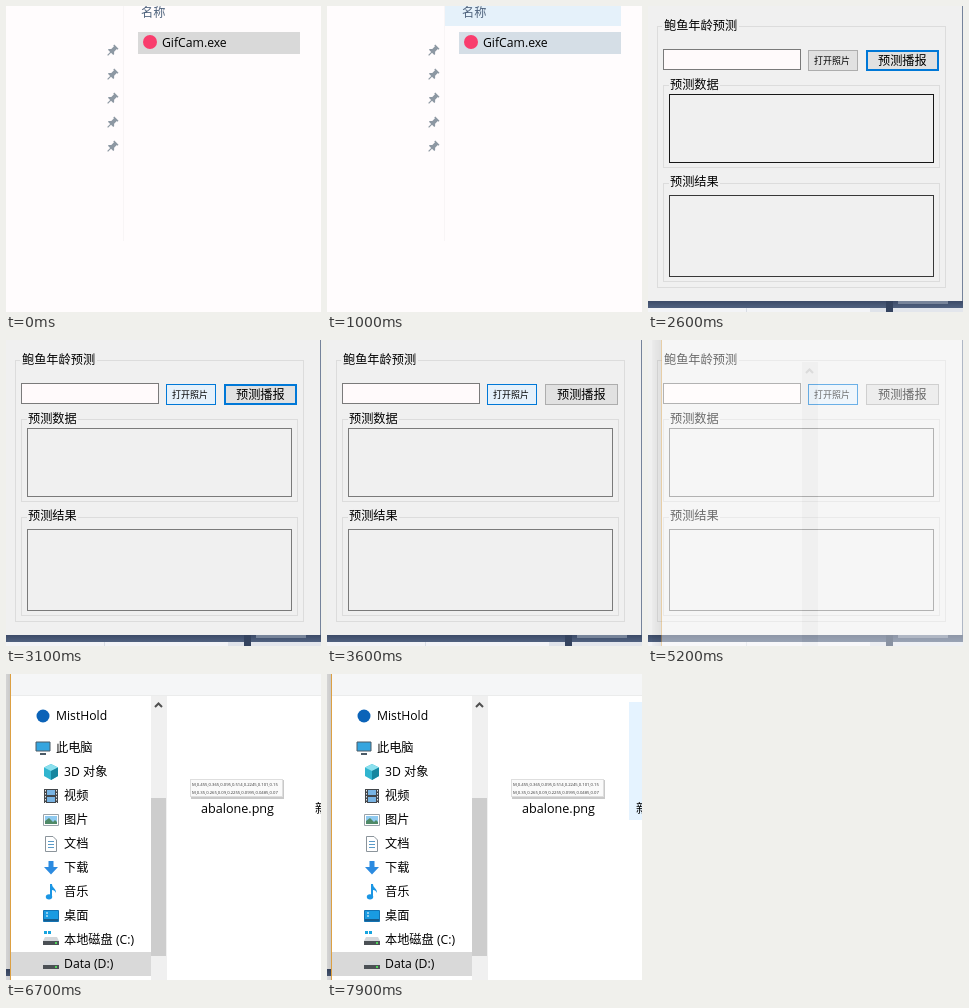
Animation of 315 by 306 pixels, one loop 8000 ms. Source, as an HTML page:

```html
<!DOCTYPE html>
<html lang="zh-CN">
<head>
<meta charset="utf-8">
<title>Open a picture</title>
<style>
html, body { margin: 0; width: 100%; height: 100%; overflow: hidden; background: #fff; }
svg { display: block; width: 315px; height: 306px; }
text { font: 12.2px "Open Sans", "Noto Sans CJK SC", "Noto Sans CJK JP", sans-serif; fill: #000; }
rect, .line { shape-rendering: crispEdges; }
.box { fill: none; stroke: #7a7a7a; }
.group { fill: none; stroke: #dcdcdc; }
.tiny { font-size: 4.2px; fill: #333; }
.small { font-size: 9px; }

/* One loop is 8 s, so 1.25% is 100 ms. */
.anim { animation: 8s step-end infinite; }
#files { animation-name: files; }
#head { animation-name: head; }
#row { animation-name: row; }
#data { animation-name: data; }
#result { animation-name: result; }
#open { animation-name: open; }
#ring { animation-name: ring; }
#dialog { animation-name: dialog; }
#thumb { animation-name: thumb; }
#arrow { animation-name: arrow; }
#ghost { animation-name: ghost; }
#tree { animation-name: tree; }
#items { animation-name: items; }
#hover { animation-name: hover; }

@keyframes files { 0% { visibility: visible } 26.25%, 100% { visibility: hidden } }
@keyframes head {
  0% { fill: #fffcfd } 11.25% { fill: #f3f7fb } 12.5% { fill: #e5f1fa }
  13.75% { fill: #d9ebf9 } 18.75% { fill: #ecf5fc } 20%, 100% { fill: #fff }
}
@keyframes row {
  0% { fill: #d9d9d9 } 11.25% { fill: #d0e3f2 } 12.5% { fill: #d5deE6 }
  13.75%, 100% { fill: #d9d9d9 }
}
@keyframes result {
  0% { stroke: #7a7a7a } 28.75% { stroke: #4a4a4a } 30% { stroke: #171717 }
  32.5% { stroke: #383838 } 33.75% { stroke: #5a5a5a } 35%, 100% { stroke: #7a7a7a }
}
@keyframes data {
  0% { stroke: #7a7a7a } 32.5% { stroke: #171717 } 35% { stroke: #4a4a4a }
  36.25%, 100% { stroke: #7a7a7a }
}
@keyframes open {
  0% { fill: #e1e1e1; stroke: #adadad } 36.25% { fill: #e3e9ee; stroke: #5793c2 }
  37.5% { fill: #e5f1fb; stroke: #0078d7 } 42.5% { fill: #cce4f7; stroke: #005499 }
  43.75%, 100% { fill: #e5f1fb; stroke: #0078d7 }
}
@keyframes ring { 0% { visibility: visible } 42.5%, 100% { visibility: hidden } }
@keyframes dialog {
  0% { opacity: 0; transform: translateX(9px) } 65% { opacity: .42; transform: translateX(9px) }
  66.25% { opacity: .85; transform: translateX(3px) } 67.5%, 100% { opacity: 1; transform: none }
}
@keyframes thumb { 0% { visibility: hidden } 76.25%, 100% { visibility: visible } }
@keyframes arrow { 0% { stroke: #bfbfbf } 76.25%, 100% { stroke: #505050 } }
@keyframes ghost { 0% { visibility: hidden } 67.5% { visibility: visible } 82.5%, 100% { visibility: hidden } }
@keyframes tree { 0% { visibility: hidden } 82.5%, 100% { visibility: visible } }
@keyframes items { 0% { visibility: hidden } 83.75%, 100% { visibility: visible } }
@keyframes hover { 0% { visibility: hidden } 98.75%, 100% { visibility: visible } }
</style>
</head>
<body>
<svg viewBox="0 0 315 306">
  <defs>
    <linearGradient id="shade">
      <stop offset="0" stop-color="#000" stop-opacity=".05"/>
      <stop offset="1" stop-color="#000" stop-opacity=".16"/>
    </linearGradient>
    <linearGradient id="navy" x2="0" y2="1">
      <stop offset="0" stop-color="#3c4b68"/>
      <stop offset="1" stop-color="#50617f"/>
    </linearGradient>
    <g id="pin" fill="#8d98a3">
      <path transform="rotate(45)" d="M-3-6.2H3V-4.8H2V-1L3.8.8V2H.6V6.2H-.6V2H-3.8V.8L-2-1V-4.8H-3Z"/>
    </g>
    <g id="disk">
      <path d="M2 6H14L16 10H0Z" fill="#d4d7da"/>
      <rect y="10" width="16" height="4" fill="#4b5055"/>
      <rect x="12" y="11" width="2" height="2" fill="#4fd35a"/>
    </g>
  </defs>

  <!-- Form window -->
  <g id="form">
    <rect width="315" height="306" fill="#f0f0f0"/>
    <rect x="314" width="1" height="296" fill="#75839b"/>
    <rect y="295" width="315" height="7" fill="url(#navy)"/>
    <rect y="302" width="222" height="4" fill="#f3f4f7"/>
    <rect x="98" y="302" width="1" height="4" fill="#d9dde4"/>
    <rect x="222" y="302" width="16" height="4" fill="#dfe3ea"/>
    <rect x="238" y="295" width="7" height="11" fill="#34435f"/>
    <rect x="245" y="302" width="70" height="4" fill="#e3e6ec"/>
    <rect x="250" y="295" width="50" height="3" fill="#77849a"/>

    <rect class="group" x="9.500" y="20.500" width="288" height="261"/>
    <rect class="group" x="15.500" y="79.500" width="276" height="82"/>
    <rect class="group" x="15.500" y="177.500" width="276" height="98"/>
    <g fill="#f0f0f0">
      <rect x="14" y="12" width="77" height="15"/>
      <rect x="21" y="71" width="51" height="14"/>
      <rect x="21" y="168" width="51" height="15"/>
    </g>
    <text x="16" y="24">鲍鱼年龄预测</text>
    <text x="22" y="83">预测数据</text>
    <text x="22" y="180">预测结果</text>

    <rect x="15.500" y="43.500" width="137" height="20" fill="#fffafb" stroke="#7a7a7a"/>
    <rect id="open" class="anim" x="160.500" y="44.500" width="49" height="20"/>
    <text class="small" x="166" y="58">打开照片</text>
    <rect x="218.500" y="44.500" width="72" height="20" fill="#e1e1e1" stroke="#adadad"/>
    <rect id="ring" class="anim" x="219" y="45" width="71" height="19" fill="none" stroke="#0078d7" stroke-width="2"/>
    <text x="230" y="59">预测播报</text>
    <rect id="data" class="box anim" x="21.500" y="88.500" width="264" height="68"/>
    <rect id="result" class="box anim" x="21.500" y="189.500" width="264" height="81"/>
  </g>

  <!-- Open dialog -->
  <g id="dialog" class="anim">
    <rect x="-5" width="9" height="306" fill="url(#shade)"/>
    <rect x="4" width="320" height="306" fill="#fff"/>
    <rect x="4" width="1" height="306" fill="#dca043"/>
    <g id="ghost" class="anim">
      <rect x="16" y="44" width="129" height="18" fill="#fff8f9"/>
      <g fill="none" stroke="#fcfcfc">
        <rect x="22.500" y="89.500" width="262" height="66"/>
        <rect x="22.500" y="190.500" width="262" height="79"/>
      </g>
    </g>
    <g id="tree" class="anim">
      <rect x="5" width="310" height="21" fill="#f5f6f7"/>
      <rect x="5" y="21" width="310" height="1" fill="#ebecec"/>
      <rect x="5" y="278" width="140" height="24" fill="#d9d9d9"/>

      <circle cx="37" cy="42" r="6.500" fill="#0b63b8"/>
      <g transform="translate(29 66)">
        <path d="M1 2H15V11H1Z" fill="#35a5df" stroke="#4b5a66"/>
        <path d="M5 14H11" stroke="#4b5a66" stroke-width="2"/>
      </g>
      <g transform="translate(37 90)">
        <path d="M8 0L15 3.500V12L8 16L1 12V3.500Z" fill="#31b5cf"/>
        <path d="M8 0L15 3.500L8 7L1 3.500Z" fill="#8be0ee"/>
        <path d="M8 7L15 3.500V12L8 16Z" fill="#15869f"/>
      </g>
      <g transform="translate(37 114)">
        <path d="M1 1H15V15H1Z" fill="#42464a"/>
        <path d="M4 2H12V7H4ZM4 9H12V14H4Z" fill="#78b4e4"/>
        <path d="M2.500 2V15M13.500 2V15" stroke="#e7e7e7" stroke-dasharray="1.500 1.500"/>
      </g>
      <g transform="translate(37 138)">
        <path d="M.5 2.500H15.500V13.500H.5Z" fill="#fff" stroke="#9aa3aa"/>
        <path d="M2 4H14V12H2Z" fill="#8fcaf0"/>
        <path d="M2 12V9L6 6L10 10L12 8L14 10V12Z" fill="#4f8a68"/>
      </g>
      <g transform="translate(37 162)">
        <path d="M2.500.5H10L13.500 4V15.500H2.500Z" fill="#fff" stroke="#8b949b"/>
        <path d="M5 5.500H11M5 8.500H11M5 11.500H11" stroke="#5b9bc8"/>
      </g>
      <path transform="translate(37 186)" d="M5.500 1H10.500V7H15L8 14.500L1 7H5.500Z" fill="#2c8be0"/>
      <g transform="translate(37 210)" fill="#1b96e4">
        <path d="M7 0H9C9 4 13 4 13 9C12 7 11 6 9 6V13H7Z"/>
        <ellipse cx="6" cy="12.800" rx="3.200" ry="2.600"/>
      </g>
      <g transform="translate(37 234)">
        <path d="M.5 2.500H15.500V13.500H.5Z" fill="#199be2" stroke="#1373b3"/>
        <path d="M1 12H15" stroke="#175d8e" stroke-width="2"/>
        <path d="M3 5H5M3 8H5" stroke="#fff"/>
      </g>
      <use href="#disk" x="37" y="257"/>
      <path d="M38 257H41V260H38ZM42 257H45V260H42Z" fill="#16a4df"/>
      <use href="#disk" x="37" y="281"/>

      <text x="50" y="46">MistHold</text>
      <text x="50" y="78">此电脑</text>
      <text x="58" y="102">3D 对象</text>
      <text x="58" y="126">视频</text>
      <text x="58" y="150">图片</text>
      <text x="58" y="174">文档</text>
      <text x="58" y="198">下载</text>
      <text x="58" y="222">音乐</text>
      <text x="58" y="246">桌面</text>
      <text x="58" y="270">本地磁盘 (C:)</text>
      <text x="58" y="294">Data (D:)</text>
    </g>
    <rect x="145" y="22" width="16" height="284" fill="#f0f0f0"/>
    <path id="arrow" class="anim" d="M149 33L152.500 29.500L156 33" fill="none" stroke-width="2"/>
    <rect id="thumb" class="anim" x="145" y="124" width="15" height="158" fill="#cdcdcd"/>
    <g id="items" class="anim">
      <rect id="hover" class="anim" x="302" y="28" width="13" height="118" fill="#e5f3ff"/>
      <rect x="185" y="106" width="93" height="19" fill="#c9c9c9"/>
      <rect x="184.500" y="105.500" width="92" height="17" fill="#fafafa" stroke="#dedede"/>
      <text class="tiny" x="186" y="112">M,0.455,0.365,0.095,0.514,0.2245,0.101,0.15</text>
      <text class="tiny" x="186" y="120">M,0.35,0.265,0.09,0.2255,0.0995,0.0485,0.07</text>
      <text x="231.500" y="139" text-anchor="middle" style="font-size:12.600px">abalone.png</text>
      <text x="309" y="139">新</text>
    </g>
  </g>

  <!-- File list -->
  <g id="files" class="anim">
    <rect width="315" height="306" fill="#fffcfd"/>
    <rect x="117" width="1" height="235" fill="#f8f5f6"/>
    <rect id="head" class="anim" x="118" width="176" height="20"/>
    <text x="135" y="11" style="fill:#4c607a">名称</text>
    <rect id="row" class="anim" x="132" y="26" width="162" height="22"/>
    <circle cx="144" cy="36" r="7" fill="#f93d6d"/>
    <text x="156" y="41">GifCam.exe</text>
    <use href="#pin" x="106" y="45"/>
    <use href="#pin" x="106" y="69"/>
    <use href="#pin" x="106" y="93"/>
    <use href="#pin" x="106" y="117"/>
    <use href="#pin" x="106" y="141"/>
  </g>
</svg>
</body>
</html>
```
